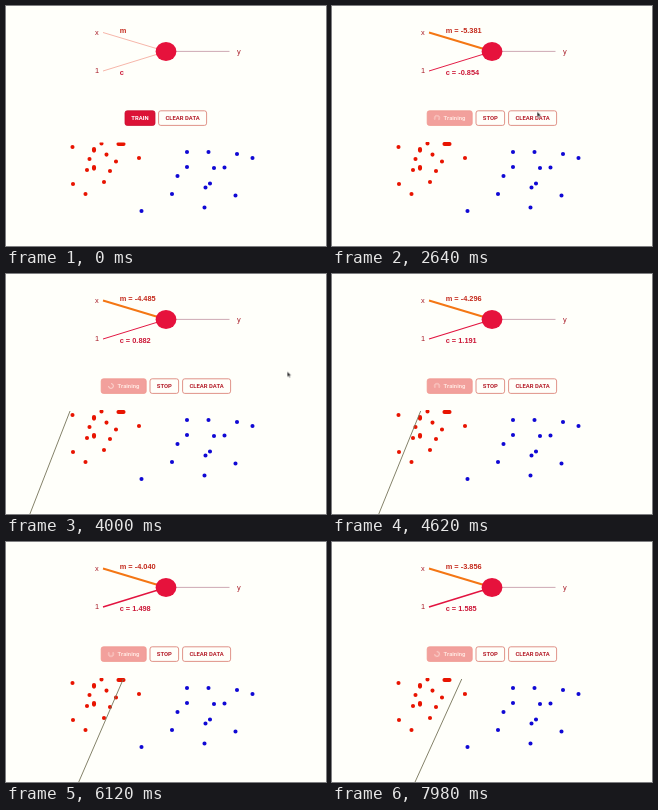
An HTML page that plays this animation: 320 px wide and 240 px high, repeating every 8000 ms.

```html
<!DOCTYPE html>
<html lang="en">
<head>
<meta charset="utf-8">
<title>Training a single neuron</title>
<style>
  html, body { margin: 0; width: 100%; height: 100%; overflow: hidden; background: #fffffa; }
  svg { display: block; width: 100vw; height: 100vh; }
  .label { font: 7.4px "Liberation Sans", Arial, sans-serif; fill: #a81c28; }
  .weight { font-weight: 700; }
  #textM { fill: #c42a1c; }
  #textC { fill: #cc1838; }
  .button text { font: 700 5.9px Roboto, sans-serif; text-anchor: middle; fill: #b41c28; }
  .button rect { fill: #fffffa; stroke: #d8786c; stroke-width: .8; }
  .primary rect { fill: #dc1236; stroke: #c81030; }
  .primary text { fill: #fff; }
  .busy rect { fill: #f2a09c; stroke: #f09890; }
  .busy text { fill: #ffe6e0; }
  .points { fill: none; stroke-width: 4.1; stroke-linecap: round; }
  #spinner { fill: none; stroke: #ffe6e0; stroke-width: .8; transform-origin: 105px 112px; animation: spin 1s linear infinite; }
  #cursor { animation: wander 8s linear infinite; }
  #arrow { animation: hover 8s step-end infinite reverse; }
  @keyframes spin { to { transform: rotate(360deg); } }
  @keyframes wander {
    0% { transform: translate(187px, 216px); }
    10.5% { transform: translate(174px, 176px); }
    19%, 27% { transform: translate(138px, 116.5px); }
    36% { transform: translate(246px, 99px); }
    43% { transform: translate(261px, 98px); }
    56%, 100% { transform: translate(301px, 97px); }
  }
</style>
</head>
<body>
<svg viewBox="0 0 320 240">
  <defs><clipPath id="plot"><rect y="136.5" width="320" height="104"/></clipPath></defs>

  <line id="edgeM" x1="97" y1="26.5" x2="152" y2="43"/>
  <line id="edgeC" x1="97" y1="65" x2="152" y2="48"/>
  <line x1="170" y1="45.4" x2="223.5" y2="45.4" stroke="#c8a0ac" stroke-width=".9"/>
  <ellipse cx="160" cy="45.5" rx="10.4" ry="9.5" fill="#e6123c"/>
  <text class="label" x="89" y="28.7">x</text>
  <text class="label" x="89" y="67.3">1</text>
  <text class="label" x="231" y="47.7">y</text>
  <text class="label weight" id="textM" x="113.7" y="26.6">m</text>
  <text class="label weight" id="textC" x="113.7" y="68.9">c</text>

  <g id="idle"></g>
  <g id="running"></g>

  <g clip-path="url(#plot)">
    <path class="points" stroke="#e81400" d="M66.5 141h0M95.5 137.5h0M112.5 138h5M88 143v1.6M83.5 153h0M100.5 148.6h0M110 155.5h0M133 152h0M81 164h0M88 161v1.6M104 165h0M98 176h0M67 178h0M79.5 188h0" id="red"/>
    <path class="points" stroke="#1008d4" d="M181 146h0M202.5 146h0M231 148h0M246.5 152h0M181 161h0M208 162h0M218.5 161.5h0M171.5 170h0M204 177.5h0M199.5 181.5h0M166 188h0M229.5 189.5h0M198.5 201.5h0M135.5 205h0"/>
    <line id="boundary" y1="137" y2="240" stroke="#76745a" stroke-width=".9"/>
  </g>

  <g id="cursor">
    <path id="pointer" d="M0 0V5.4L1.3 4.3L2.2 6.2L3.1 5.8L2.3 4H3.9Z" fill="#222" stroke="#fff" stroke-width=".4"/>
    <path id="hand" d="M-1.5 4V-2.5Q-.7 -3.8 0 -2.5V.2L3.5 1V4L2.4 6H-.8L-3 2.5Q-2.8 1.3 -1.5 2.5Z" fill="#d8485a" stroke="#fff4dc" stroke-width=".9"/>
  </g>
</svg>
<script>
const DURATION = 8000, HOVER = 1420, CLICK = 2080, LEAVE = 4500;
const get = id => document.getElementById(id);

function add(parent, tag, attrs, text = '') {
  const el = document.createElementNS('http://www.w3.org/2000/svg', tag);
  for (const name in attrs) el.setAttribute(name, attrs[name]);
  el.textContent = text;
  return parent.appendChild(el);
}

function button(parent, x, width, text, kind = '', textX = x + width / 2) {
  const group = add(parent, 'g', { class: 'button ' + kind });
  add(group, 'rect', { x, y: 104.8, width, height: 14.6, rx: 2.2 });
  add(group, 'text', { x: textX, y: 114.3 }, text);
}

button(get('idle'), 119, 30, 'TRAIN', 'primary');
button(get('idle'), 152.6, 48, 'CLEAR DATA');
button(get('running'), 95.2, 45, 'Training', 'busy', 122.5);
button(get('running'), 144, 28.6, 'STOP');
button(get('running'), 176.6, 48, 'CLEAR DATA');
add(get('running'), 'path', { id: 'spinner', d: 'M105 109.6A2.4 2.4 0 1 1 102.6 112' });

// Both weights settle at the same rate; m keeps a slow drift.
function weights(t) {
  const age = t - 3420, decay = Math.exp(-.0009 * age);
  return { m: -4.2 + .0000775 * age - .556 * decay, c: 1.605 - 1.22 * decay };
}

function setEdge(id, weight, strongColor) {
  const size = Math.abs(weight);
  get(id).setAttribute('stroke', size > .6 ? strongColor : '#ee7a68');
  get(id).setAttribute('stroke-width', Math.min(1.9, .55 + .75 * Math.max(0, size - .3)));
}

function show(id, visible) {
  get(id).style.display = visible ? '' : 'none';
}

function draw(t) {
  const running = t >= CLICK;
  const { m, c } = running ? weights(t) : { m: 0, c: 0 };
  get('textM').textContent = running ? 'm = ' + m.toFixed(3) : 'm';
  get('textC').textContent = running ? 'c = ' + c.toFixed(3) : 'c';
  setEdge('edgeM', m, '#f47614');
  setEdge('edgeC', c, '#e21440');
  show('idle', !running);
  show('running', running);
  show('boundary', running);
  if (running) {
    get('boundary').setAttribute('x1', (303 * c + 20) / -m);
    get('boundary').setAttribute('x2', (303 * c - 160) / -m);
  }

  const hovering = t >= HOVER && t < CLICK;
  show('hand', hovering);
  show('pointer', !hovering);
  show('cursor', t >= 20 && t < LEAVE);
}

const start = performance.now();
function frame() {
  draw((performance.now() - start) % DURATION);
  requestAnimationFrame(frame);
}
frame();
</script>
</body>
</html>
```
